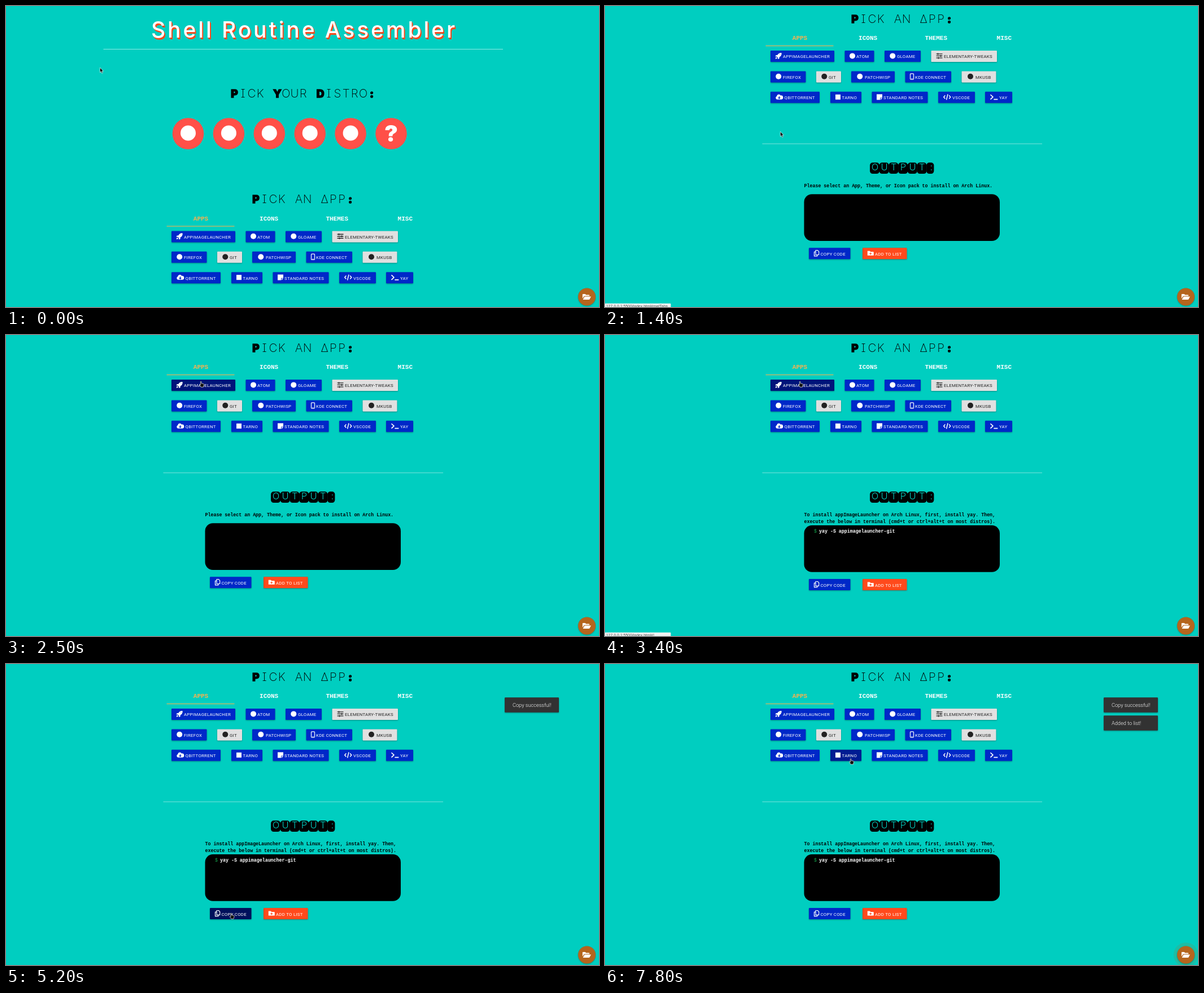
Write an HTML page that moves like this. It is 1050 by 533 pixels and loops after 8000 ms.

```html
<!DOCTYPE html>
<html lang="en">
<head>
<meta charset="utf-8">
<title>Shell Routine Assembler</title>
<style>
html, body { margin: 0; width: 100%; height: 100%; overflow: hidden; background: #00cec0; }
svg { display: block; width: 1050px; height: 533px; }
text { white-space: pre; }
.title { font: 500 39px Inter, sans-serif; letter-spacing: 3.9px; }
.head, .out { font: 200 20.6px Inter, sans-serif; font-feature-settings: "cv08"; text-anchor: middle; }
.head .fat { font-weight: 800; font-size: 19px; stroke: #000; stroke-width: 1.7px; }
.out { font-size: 16.5px; font-weight: 300; fill: #00cec0; }
.tab { font: bold 11px "Liberation Mono", monospace; text-anchor: middle; }
.code { font: bold 8.3px "Liberation Mono", monospace; }
.label { font: 400 7.8px Roboto, sans-serif; letter-spacing: .28px; }
.note { font: 300 9.2px Roboto, sans-serif; fill: #fff; }
.status { font: 6.9px "Liberation Sans", sans-serif; fill: #555; }
.raised { filter: drop-shadow(0 1px 1px rgba(0, 0, 0, .32)); }
</style>
</head>
<body>
<svg id="stage" viewBox="0 0 1050 533"></svg>
<script>
const NS = 'http://www.w3.org/2000/svg';
const BLUE = '#0028c8', GREY = '#e0e0e0', RED = '#ff4a1c', LOOP = 8000;
const SCROLL = 319.4;
const stage = document.getElementById('stage');

function add(parent, tag, attrs = {}, text) {
  const el = document.createElementNS(NS, tag);
  for (const key in attrs) el.setAttribute(key, attrs[key]);
  if (text !== undefined) el.textContent = text;
  parent.append(el);
  return el;
}
const rect = (p, x, y, width, height, fill, rx = 0) =>
  add(p, 'rect', { x, y, width, height, fill, rx });
const label = (p, x, y, cls, text, fill) =>
  add(p, 'text', fill ? { x, y, class: cls, fill } : { x, y, class: cls }, text);
const move = (el, x, y) => el.setAttribute('transform', `translate(${x} ${y})`);
const show = (el, on) => el.setAttribute('opacity', +on);

// Each icon: path, stroke width (0 = filled), optional detail cut in the button colour
const icons = {
  rocket: ['M5.3-5.5C1-5.6-1-3.4-2-1.4H-4.6L-5.6 1.2H-3L-1.2 3V5.6L1.4 4.6V2C3.8 .8 5.8-1.4 5.3-5.5ZM-3.8 2.2C-5.2 2.8-5.4 4-5.4 5.4C-4 5.4-2.8 5-2.3 3.7Z', 0, 'M2.4-2.8h.6'],
  dot: ['M-5 0a5 5 0 1 0 10 0a5 5 0 1 0-10 0', 0],
  square: ['M-4.5-4.5h9v9h-9Z', 0],
  sliders: ['M-5.5-3.5H5.5M-5.5 0H5.5M-5.5 3.5H5.5M-2.5-5v3M2.5-1.5v3M-1.5 2v3', 1.4],
  phone: ['M-2-5H2Q3-5 3-4V4Q3 5 2 5H-2Q-3 5-3 4V-4Q-3-5-2-5ZM-.5 3.6H.5', 1.2],
  cloud: ['M-4 4.2A3 3 0 0 1-4.3-1.5A3.6 3.6 0 0 1 2.5-2.8A3.2 3.2 0 0 1 4 4.2Z', 0, 'M0-1.5V2.5M-1.8 .9L0 2.7L1.8 .9'],
  memo: ['M-5-5H5V1.2H1.2V5H-5ZM2 2H5L2 5Z', 0],
  code: ['M-3.4-3L-6 0L-3.4 3M3.4-3L6 0L3.4 3M1.2-5L-1.2 5', 1.5],
  prompt: ['M-6.3-4.2L-1.8 0L-6.3 4.2M-.4 4.2H6.6', 1.7],
  copy: ['M-1.5-5H2L4.2-2.8V2.8H-1.5ZM-1.5-2.4H-4V5.2H1.4V2.8', 1.2],
  folder: ['M-5.5-4H-1.5L0-2.5H4.6Q5.5-2.5 5.5-1.6V4H-5.5Z', 0, 'M0-1.2V2.8M-2 .8H2']
};

function button(p, x, right, y, textX, text, icon, color = BLUE) {
  const ink = color === GREY ? '#222' : '#fff';
  const g = add(p, 'g');
  const body = rect(g, x, y, right - x, 20, color, 1.1);
  body.setAttribute('class', 'raised');
  const [d, width, cut] = icons[icon];
  const mark = add(g, 'g');
  move(mark, (x + textX + 6.5) / 2, y + 9.4);
  add(mark, 'path', width
    ? { d, fill: 'none', stroke: ink, 'stroke-width': width, 'stroke-linejoin': 'round' }
    : { d, fill: ink });
  if (cut) add(mark, 'path', { d: cut, fill: 'none', stroke: color, 'stroke-width': 1.2 });
  label(g, textX, y + 13.5, 'label', text, ink);
  return body;
}

// Letters centred on an even grid; a star marks a heavy letter
function gridText(cls, x, y, pitch, text) {
  const places = [...text.replaceAll('*', '')].map((_, i) => x + i * pitch).join(' ');
  const el = add(page, 'text', { x: places, y, class: cls });
  for (const part of text.split(/(\*.)/).filter(Boolean))
    add(el, 'tspan', part[0] === '*' ? { class: 'fat' } : {}, part.replace('*', ''));
}

// Scrolling page
const page = add(stage, 'g');
for (const [dx, dy, fill] of [[2, 2.6, RED], [1, 1.3, RED], [0, 0, '#fff']])
  label(page, 257 + dx, 56 + dy, 'title', 'Shell Routine Assembler', fill);
rect(page, 172.5, 76, 707.5, 1, '#8eeae3');
gridText('head', 404.5, 162.3, 15.2, '*PICK *YOUR *DISTRO*:');
gridText('head', 442.5, 349.1, 15.2, '*PICK AN ΔPP*:');

for (let i = 0; i < 6; i++) {
  const cx = 322.5 + i * 71.9;
  add(page, 'circle', { cx, cy: 226, r: 27.8, fill: '#ff5048' });
  if (i < 5) add(page, 'circle', { cx, cy: 225, r: 13.5, fill: '#fff' });
  else add(page, 'text', { x: cx, y: 239.6, fill: '#fff', 'text-anchor': 'middle',
    style: 'font: 900 40px Inter, sans-serif' }, '?');
}

['APPS', 'ICONS', 'THEMES', 'MISC'].forEach((name, i) =>
  label(page, 345 + i * 120.6, 379.9, 'tab', name, i ? '#fff' : '#f7b250'));
rect(page, 284.5, 389.4, 120, 1.1, '#f8b44e');

const rows = [
  [[293, 406, 315, 'APPIMAGELAUNCHER', 'rocket'], [424.5, 476.5, 445, 'ATOM', 'dot'],
   [495, 559, 517, 'GLOAME', 'dot'], [577.5, 694, 600, 'ELEMENTARY-TWEAKS', 'sliders', GREY]],
  [[293, 355.5, 315, 'FIREFOX', 'dot'], [374, 418, 396, 'GIT', 'dot', GREY],
   [436, 513, 460, 'PATCHWISP', 'dot'], [531.5, 613, 549, 'KDE CONNECT', 'phone'],
   [631.5, 692.5, 656, 'MKUSB', 'dot', GREY]],
  [[293, 380, 317.5, 'QBITTORRENT', 'cloud'], [399, 454, 419.5, 'TARNO', 'square'],
   [472.5, 571.5, 493, 'STANDARD NOTES', 'memo'], [590, 655, 615, 'VSCODE', 'code'],
   [673, 721, 698, 'YAY', 'prompt']]
];
const apps = rows.map((row, r) => row.map(([x, right, tx, text, icon, color]) =>
  button(page, x, right, 398.4 + r * 36.4, tx, text, icon, color)));

rect(page, 278.5, 562.9, 495.5, 1, '#7fe6de');
for (let i = 0; i < 7; i++)
  rect(page, 469 + i * 16.7, 596.7, i < 6 ? 17 : 13.2, 19.8, '#000', 5);
gridText('out', 478, 610.4, 16.65, 'OUTPUT:');

const hint = label(page, 352.5, 640.2, 'code', 'Please select an App, Theme, or Icon pack to install on Arch Linux.');
const steps = add(page, 'g');
label(steps, 352.5, 640.2, 'code', 'To install appImageLauncher on Arch Linux, first, install yay. Then,');
label(steps, 352.5, 652.4, 'code', 'execute the below in terminal (cmd+t or ctrl+alt+t on most distros).');

const output = add(page, 'g');
rect(output, 352.5, 652.7, 346.5, 82.7, '#000', 13.9);
const copyBtn = button(output, 361, 434.5, 747.7, 381.5, 'COPY CODE', 'copy');
const listBtn = button(output, 456, 534.5, 747.7, 478, 'ADD TO LIST', 'folder', RED);
const command = add(output, 'g');
label(command, 370, 665.9, 'code', '$', '#13a04a').setAttribute('style', 'font-weight: 400');
label(command, 379, 665.9, 'code', 'yay -S appimagelauncher-git', '#fff');

const tip = add(page, 'g');
rect(tip, 304, 261.5, 37, 21.5, '#323232', 1);
add(tip, 'text', { x: 322.5, y: 275.4, class: 'note', 'text-anchor': 'middle' }, 'Arch');

// Fixed layer
const ring = add(stage, 'circle', { cx: 1028.5, cy: 515, r: 15.5, fill: '#b5651d' });
add(stage, 'circle', { cx: 1028.5, cy: 515, r: 15.5, fill: '#b5651d', class: 'raised' });
add(stage, 'path', { fill: '#fff', transform: 'translate(1028.3 515)',
  d: 'M-7.5 3V-4Q-7.5-5-6.5-5H-2.8L-1.2-3.5H3.8Q4.8-3.5 4.8-2.5V-1.4H-3.4Q-4.6-1.4-5.2-.5ZM-6.8 4.9L-4.3 .2Q-4-.5-3.2-.5H7.6L5.2 4Q4.8 4.9 4 4.9Z' });

function toast(text) {
  const g = add(stage, 'g');
  rect(g, 883, 59.3, 96, 26.4, '#323232', 1.2).setAttribute('class', 'raised');
  label(g, 897, 75.7, 'note', text);
  return g;
}
const copied = toast('Copy successful!'), listed = toast('Added to list!');

const status = add(stage, 'g');
rect(status, -1, 526.8, 117.5, 8, '#f0f2f2', 1);
const link = label(status, 2, 534.4, 'status', '');

const cursor = add(stage, 'g');
const arrow = add(cursor, 'path', { d: 'M.4.4V9L2.3 7.3L3.7 10.5L5.2 9.9L3.8 6.7H6.4Z',
  fill: '#000', stroke: '#e8f6f5', 'stroke-width': .7 });
const hand = add(cursor, 'path', {
  d: 'M1.4 1.2Q2.2 0 3 1.2V4.2L6.6 4.8Q7.7 5 7.6 6.2L7.1 8.6L6.4 10.8H2.3L-.2 7.2Q-.3 6 .9 6.3L1.4 6.8Z',
  fill: '#111', stroke: '#f2f2f2', 'stroke-width': .7 });

// Last entry whose time has come
const at = (list, t) => list.reduce((best, item) => item[0] <= t ? item : best);

// [time, x, y, hand, steps of 100 ms]
const path = [
  [0, 166, 108.6, 0], [400, 310, 222, 1, 6], [1400, 310, 222, 0], [1700, 343, 81.5, 1, 9],
  [3700, 399, 349, 0], [3900, 404, 359, 0], [4400, 397, 418, 0], [4700, 396, 440, 1],
  [5200, 396.5, 440.5, 1], [5400, 447, 403, 0], [5700, 448, 368, 0], [6000, 522, 427, 0],
  [6300, 507.5, 443, 1], [7200, 499, 223, 0], [7500, 450, 172, 0], [7800, 433, 167, 1]
];
const fills = [
  [apps[0][0], [[0, BLUE], [2400, '#00209f'], [2500, '#00147a'], [3700, BLUE]]],
  [copyBtn, [[0, BLUE], [4700, '#00177c'], [4900, '#00115c'], [5400, '#001b90'], [5700, BLUE]]],
  [listBtn, [[0, RED], [6300, '#d83e16'], [6600, '#cb3813'], [7200, RED]]],
  [apps[2][1], [[0, BLUE], [7800, '#001c92']]]
];
const tips = [[0, 0], [1000, .35], [1100, .8], [1200, .95], [1300, 0]];
const links = [[0, ''], [1400, '#matTabs'], [1700, ''], [3400, '#!'], [3900, '']];
const rings = [[0, 15.5, 0], [6600, 17.2, .85], [7200, 15.5, 0], [7800, 21.8, .16]];

function placeCursor(t) {
  const now = at(path, t);
  let [start, x, y, isHand, count] = now;
  const done = Math.floor((t - start) / 100) + 1;
  if (count && done < count) {
    const [, px, py] = path[path.indexOf(now) - 1];
    const p = done / count, e = p * p * (3 - 2 * p);
    x = px + (x - px) * e;
    y = py + (y - py) * e;
    isHand = 0;
  }
  move(cursor, x, y);
  show(arrow, !isHand);
  show(hand, isHand);
}

function draw(t) {
  const picked = t >= 3400;
  move(page, 0, t >= 1300 ? -SCROLL : 0);
  move(output, 0, picked ? 3.8 : 0);
  show(hint, !picked);
  show(steps, picked);
  show(command, picked);
  show(tip, at(tips, t)[1]);

  show(copied, t < 4900 ? 0 : t < 5200 ? .85 : 1);
  move(copied, 0, t < 5200 ? 2 : 0);
  show(listed, t >= 6600);
  move(listed, 0, t < 7200 ? 36 : 32);

  const [, r, alpha] = at(rings, t);
  ring.setAttribute('r', r);
  show(ring, alpha);

  const anchor = at(links, t)[1];
  show(status, anchor !== '');
  link.textContent = '127.0.0.1:5500/index.html' + anchor;
  for (const [el, list] of fills) el.setAttribute('fill', at(list, t)[1]);
  placeCursor(t);
}

const begin = performance.now();
function tick() {
  draw((performance.now() - begin) % LOOP);
  requestAnimationFrame(tick);
}
tick();
</script>
</body>
</html>
```
